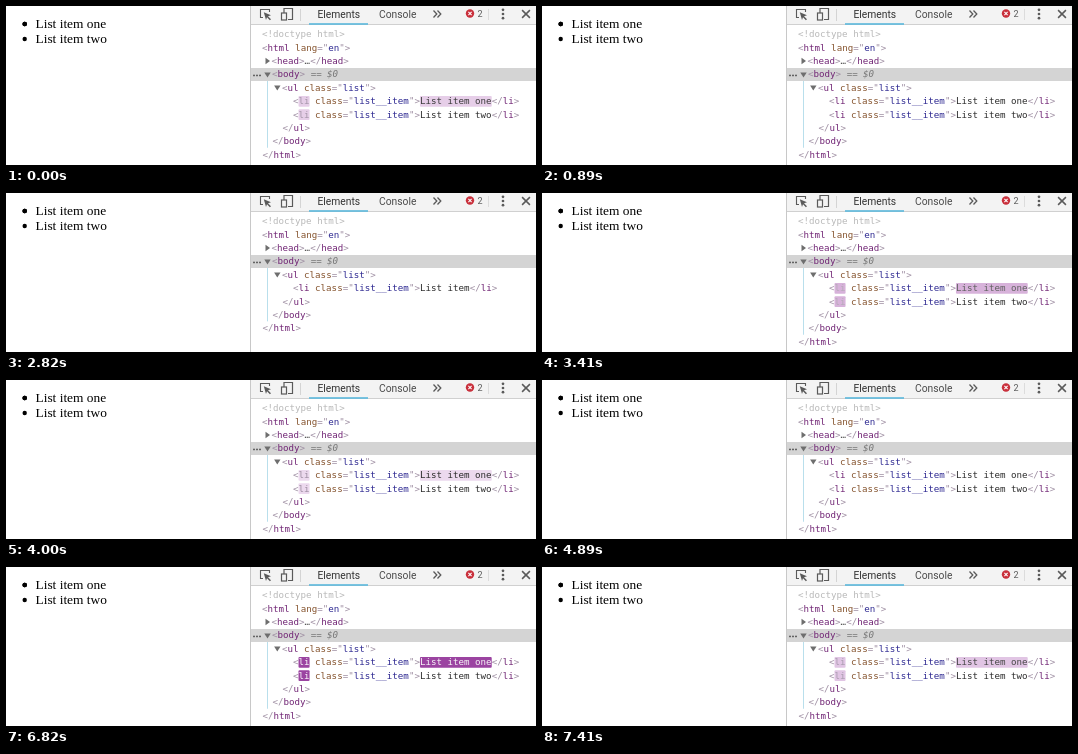
These frames come from a looping animation (530x159 px, 7510 ms). An HTML page with a canvas:

```html
<!DOCTYPE html>
<html lang="en">
<head>
<meta charset="utf-8">
<title>DOM update</title>
<style>
html, body { margin: 0; width: 100%; height: 100%; overflow: hidden; background: #fff; }
canvas { display: block; width: 530px; height: 159px; }
</style>
</head>
<body>
<canvas id="stage"></canvas>
<script>
const W = 530, H = 159, LOOP = 7510, STEP = 148.1;
const canvas = document.getElementById('stage');
const ctx = canvas.getContext('2d');
const dpr = window.devicePixelRatio || 1;
canvas.width = W * dpr;
canvas.height = H * dpr;

const MONO_SIZE = 9.17, CHAR = 5.52, ROW = 13.38, FIRST_ROW = 28.2;
const MONO = MONO_SIZE + 'px "DejaVu Sans Mono", monospace';
const SERIF = '13.4px "Liberation Serif", serif';
const UI = '10.3px Roboto, sans-serif';

const TAG = [112, 36, 116], BRACKET = [158, 142, 162], TEXT = [44, 44, 44];
const WHITE = [255, 255, 255], STRONG = [152, 62, 158], PALE = [236, 217, 238];
const ATTR = '#84522c', VALUE = '#2f2a92';

// Highlight runs in two eased parts: strong to pale, then pale to none.
const FADE = 1400, FADE_SPLIT = 0.8, FADE_LEAD = 60;

const rgb = c => `rgb(${c.map(Math.round).join(',')})`;
const mix = (a, b, k) => a.map((v, i) => v + (b[i] - v) * k);

function ease(x) {
  const bez = (a, b, s) => 3 * a * s * (1 - s) ** 2 + 3 * b * s * s * (1 - s) + s ** 3;
  let lo = 0, hi = 1;
  for (let i = 0; i < 20; i++) {
    const mid = (lo + hi) / 2;
    if (bez(0.25, 0.25, mid) < x) lo = mid; else hi = mid;
  }
  return bez(0.1, 1, lo);
}

function highlight(age) {
  const p = age / FADE;
  if (p >= 1) return null;
  if (p < FADE_SPLIT) {
    const k = ease(p / FADE_SPLIT);
    return { back: mix(STRONG, PALE, k), ink: base => mix(WHITE, base, k) };
  }
  const k = ease((p - FADE_SPLIT) / (1 - FADE_SPLIT));
  return { back: mix(PALE, WHITE, k), ink: base => base };
}

function label(str, x, y, font, color) {
  ctx.font = font;
  ctx.fillStyle = color;
  ctx.fillText(str, x, y);
}

function rect(x, y, w, h, color) {
  ctx.fillStyle = color;
  ctx.fillRect(x, y, w, h);
}

function dot(x, y, r, color) {
  ctx.fillStyle = color;
  ctx.beginPath();
  ctx.arc(x, y, r, 0, Math.PI * 2);
  ctx.fill();
}

function path(points, color, width, fill) {
  ctx.beginPath();
  points.forEach(([x, y], i) => i ? ctx.lineTo(x, y) : ctx.moveTo(x, y));
  if (fill) {
    ctx.fillStyle = color;
    ctx.fill();
  } else {
    ctx.strokeStyle = color;
    ctx.lineWidth = width;
    ctx.stroke();
  }
}

function cross(x, y, r, color, width) {
  path([[x - r, y - r], [x + r, y + r]], color, width);
  path([[x + r, y - r], [x - r, y + r]], color, width);
}

const rowY = n => FIRST_ROW + n * ROW;

// Parts are [text, colour] or [text, colour, highlight].
function code(row, x, parts) {
  const y = rowY(row);
  for (const [str, color, glow] of parts) {
    const w = str.length * CHAR;
    if (glow) {
      ctx.fillStyle = rgb(glow.back);
      ctx.beginPath();
      ctx.roundRect(x, y - 5.2, w, 10.8, 1);
      ctx.fill();
    }
    label(str, x, y + 3.1, MONO, color);
    x += w;
  }
}

const B = rgb(BRACKET), T = rgb(TAG);
const open = (name, attr, value) => attr
  ? [['<', B], [name, T], [' ', B], [attr, ATTR], ['="', B], [value, VALUE], ['">', B]]
  : [['<', B], [name, T], ['>', B]];
const close = name => [['</', B], [name, T], ['>', B]];

function item(row, str, glow, wholeText) {
  const parts = open('li', 'class', 'list__item');
  if (glow) parts[1] = ['li', rgb(glow.ink(BRACKET)), glow];
  const lit = glow && wholeText;
  parts.push([str, rgb(lit ? glow.ink(TEXT) : TEXT), lit ? glow : null]);
  code(row, 287, parts.concat(close('li')));
}

function arrowDown(x, y) {
  path([[x - 3.2, y - 2.3], [x + 3.2, y - 2.3], [x, y + 2.7]], '#6e6e6e', 0, true);
}

function page(items) {
  items.forEach((str, i) => {
    dot(18.7, 18, 2.2, '#000');
    dot(18.7, 18 + i * 15, 2.2, '#000');
    label(str, 29.5, 22.2 + i * 15, SERIF, '#000');
  });
}

function toolbar(errors) {
  const gray = '#5a5a5a';
  rect(245, 0, 285, 18, '#f3f3f3');
  rect(245, 18, 285, 1, '#d0d0d0');

  path([[257, 11.5], [254.5, 11.5], [254.5, 3.5], [263.5, 3.5], [263.5, 6]], gray, 1.1);
  path([[257.8, 6.3], [265, 9.2], [262, 10.2], [265, 13.2], [263.9, 14.2],
    [261, 11.3], [260, 14]], gray, 0, true);

  path([[278, 7], [278, 2.5], [286.5, 2.5], [286.5, 13.5], [282, 13.5]], gray, 1.2);
  ctx.strokeRect(275.5, 7, 5, 7);
  rect(294, 3, 1, 12, '#d4d4d4');

  label('Elements', 311.5, 11.8, UI, '#333');
  label('Console', 373, 11.8, UI, '#4a4a4a');
  rect(303, 17.2, 59, 1.6, '#5bb8dc');
  for (const x of [427.5, 431.5]) path([[x, 4.5], [x + 3.3, 8], [x, 11.5]], gray, 1.3);

  dot(464, 7.5, 4.2, '#c9303c');
  cross(464, 7.5, 1.6, '#fff', 1.1);
  label(String(errors), 471.5, 10.8, '9px Roboto, sans-serif', '#5a5a5a');
  rect(482, 3, 1, 11, '#dcdcdc');
  for (const y of [3.8, 8, 12.2]) dot(497, y, 1.35, gray);
  cross(520, 8, 3.9, gray, 1.5);
}

function tree(items, glow) {
  const end = 5 + items.length;
  rect(245, 62, 285, 13, '#d4d4d4');
  rect(261, 75, 1, rowY(end + 1) + 6.5 - 75, '#b9dfec');

  code(0, 256, [['<!doctype html>', '#b8b8b8']]);
  code(1, 256, open('html', 'lang', 'en'));
  const headY = rowY(2);
  path([[259.5, headY - 3.2], [264, headY], [259.5, headY + 3.2]], '#6e6e6e', 0, true);
  code(2, 265.5, [...open('head'), ['…', '#555'], ...close('head')]);

  for (const x of [248, 251, 254]) dot(x, 69.4, 0.95, '#555');
  arrowDown(261.5, 68.7);
  code(3, 266, [...open('body'), [' == ', '#777']]);
  label('$0', 321, rowY(3) + 3.1, 'italic ' + MONO, '#777');

  arrowDown(271.3, rowY(4) + 0.2);
  code(4, 276, open('ul', 'class', 'list'));
  items.forEach((str, i) => item(5 + i, str, glow, i === 0));
  code(end, 276.5, close('ul'));
  code(end + 1, 266.5, close('body'));
  code(end + 2, 256.5, close('html'));
}

const ONE = ['List item'], TWO = ['List item one', 'List item two'];
const within = (n, a, b) => n >= a && n < b;

function draw(time) {
  const t = time % LOOP;
  const n = Math.floor(t / STEP);
  const pageOne = within(n, 12, 19) || within(n, 38, 46);
  const treeOne = within(n, 12, 20) || within(n, 38, 46);

  let age = (n - 46) * STEP;
  if (n < 12) age += LOOP;
  else if (n < 38) age = (n - 20) * STEP;
  const glow = treeOne ? null : highlight(age + FADE_LEAD);

  ctx.setTransform(dpr, 0, 0, dpr, 0, 0);
  rect(0, 0, W, H, '#fff');
  page(pageOne ? ONE : TWO);
  rect(244, 0, 1, H, '#c8c8c8');
  tree(treeOne ? ONE : TWO, glow);
  toolbar(pageOne ? 1 : 2);
}

const start = performance.now();
function tick(now) {
  draw(Math.max(0, now - start));
  requestAnimationFrame(tick);
}
draw(0);
requestAnimationFrame(tick);
</script>
</body>
</html>
```
